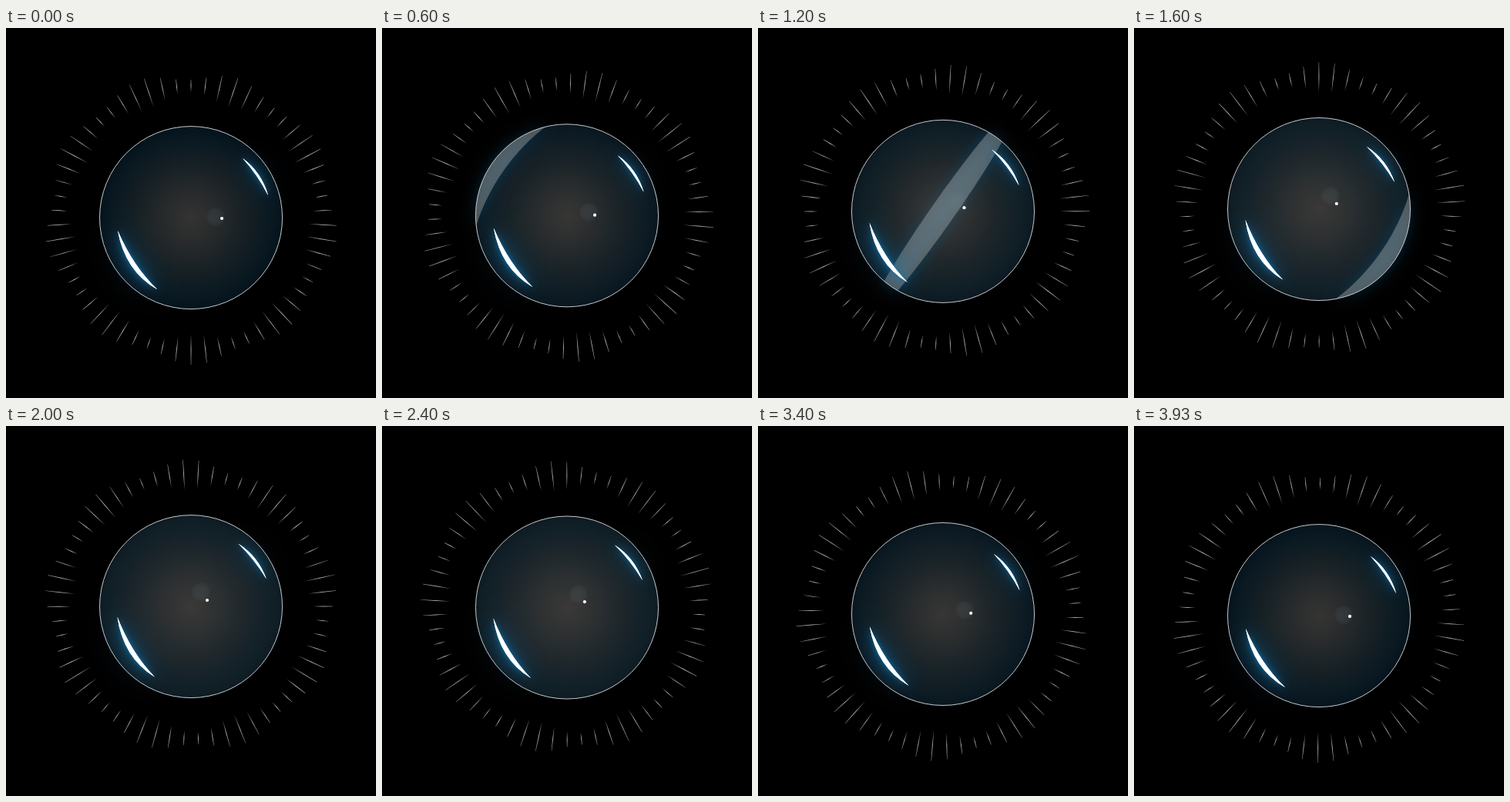
An HTML page with a canvas for the animation above (3.99 s loop, 480x480 px).

```html
<!DOCTYPE html>
<html lang="en">
<head>
<meta charset="utf-8">
<title>Glass orb</title>
<style>
  html, body { margin: 0; width: 100%; height: 100%; overflow: hidden; background: #000; }
  canvas { display: block; width: 480px; height: 480px; }
</style>
</head>
<body>
<canvas id="stage" width="480" height="480"></canvas>
<script>
const ctx = document.getElementById('stage').getContext('2d');
const LOOP = 3990, TAU = Math.PI * 2, DEG = Math.PI / 180;
const R = 118.5;
const RAYS = 58, RAY_MID = 171, STEPS = 5, WAVES = 9;

function disc(x, y, r, fill) {
  ctx.beginPath();
  ctx.arc(x, y, r, 0, TAU);
  ctx.fillStyle = fill;
  ctx.fill();
}

function radial(x, y, r, ...stops) {
  const g = ctx.createRadialGradient(x, y, 0, x, y, r);
  stops.forEach(([at, color]) => g.addColorStop(at, color));
  return g;
}

function glow(color, blur) {
  ctx.shadowColor = color;
  ctx.shadowBlur = blur;
}

// The ring turns by five rays per loop; a wave of lengths runs a little faster
function drawRays(p) {
  ctx.fillStyle = '#a6a6a6';
  for (let i = 0; i < RAYS; i++) {
    const place = i - STEPS * p;
    const half = 14 + 6 * Math.cos(TAU * (WAVES * (place - 3) / RAYS + p));
    ctx.save();
    ctx.rotate(place * TAU / RAYS);
    ctx.beginPath();
    ctx.moveTo(-0.2, -RAY_MID - half);
    ctx.lineTo(0.2, -RAY_MID - half);
    ctx.lineTo(0.5, -RAY_MID);
    ctx.lineTo(0, -RAY_MID + half);
    ctx.lineTo(-0.5, -RAY_MID);
    ctx.fill();
    ctx.restore();
  }
}

function drawGlass(p) {
  disc(0, 0, R, radial(0, 0, R,
    [0, '#353332'], [0.3, '#272a2b'], [0.62, '#151f24'], [0.88, '#091821'], [1, '#05131b']));
  disc(0, 0, R, `rgba(150,155,155,${0.06 * Math.sin(Math.PI * p)})`);
}

// A band of light between two arcs, sweeping across the sphere
function drawShine(t) {
  const s = t / 1000 - 1.2;
  const at = 2.08 * s + 0.74 * s * s;
  if (s < -0.75 || at > 1.13) return;
  const edge = (reach, v) => {
    const rim = Math.sqrt(R * R - v * v);
    const u = reach * R * Math.sqrt(1 - (v / (1.4 * R)) ** 2);
    return Math.max(-rim, Math.min(rim, u));
  };
  ctx.save();
  ctx.rotate(35 * DEG);
  ctx.beginPath();
  for (let a = -90; a <= 90; a += 2) {
    const v = R * Math.sin(a * DEG);
    ctx.lineTo(edge(at - 0.13, v), v);
  }
  for (let a = 90; a >= -90; a -= 2) {
    const v = R * Math.sin(a * DEG);
    ctx.lineTo(edge(at + 0.13, v), v);
  }
  glow('rgb(10,100,150)', 18);
  ctx.fillStyle = 'rgba(180,174,170,0.4)';
  ctx.fill();
  ctx.restore();
}

function drawCrescent(a, b, outer, inner, angle, blur) {
  ctx.save();
  ctx.rotate(angle * DEG);
  ctx.beginPath();
  ctx.moveTo(...a);
  ctx.quadraticCurveTo(...outer, ...b);
  ctx.quadraticCurveTo(...inner, ...a);
  ctx.fillStyle = '#fff';
  for (const spread of [1.6, 0.8, 0.3]) {
    glow('#0d70ab', blur * spread);
    ctx.fill();
  }
  ctx.restore();
}

function draw(t) {
  const p = t / LOOP;
  const k = (1 - Math.cos(p * TAU)) / 2;
  const cy = 240.1 + 6 * Math.cos((t + 40) / LOOP * TAU);

  ctx.clearRect(0, 0, 480, 480);
  ctx.save();
  ctx.translate(240, cy);
  drawRays(p);
  drawGlass(p);
  drawShine(t);
  drawCrescent([-95, 17], [-44, 93], [-85.5, 69.5], [-75.5, 62.5], 2 * k, 24);
  drawCrescent([67, -77], [100, -29], [91.5, -59], [86.5, -55.5], -4 * k, 20);
  ctx.beginPath();
  ctx.arc(0, 0, R, 0, TAU);
  ctx.strokeStyle = '#c4cacd';
  ctx.lineWidth = 1;
  ctx.stroke();
  ctx.restore();

  const hx = 272 - 19 * k, hy = 245 - 30 * k;
  disc(hx, hy, 13, radial(hx, hy, 13,
    [0, 'rgba(120,145,155,0.13)'], [0.7, 'rgba(110,140,150,0.1)'], [1, 'rgba(110,140,150,0)']));
  disc(280 - 19 * k, 247 - 21 * k, 2.1, '#fff');
}

const start = performance.now();
function tick() {
  draw((performance.now() - start) % LOOP);
  requestAnimationFrame(tick);
}
tick();
</script>
</body>
</html>
```
